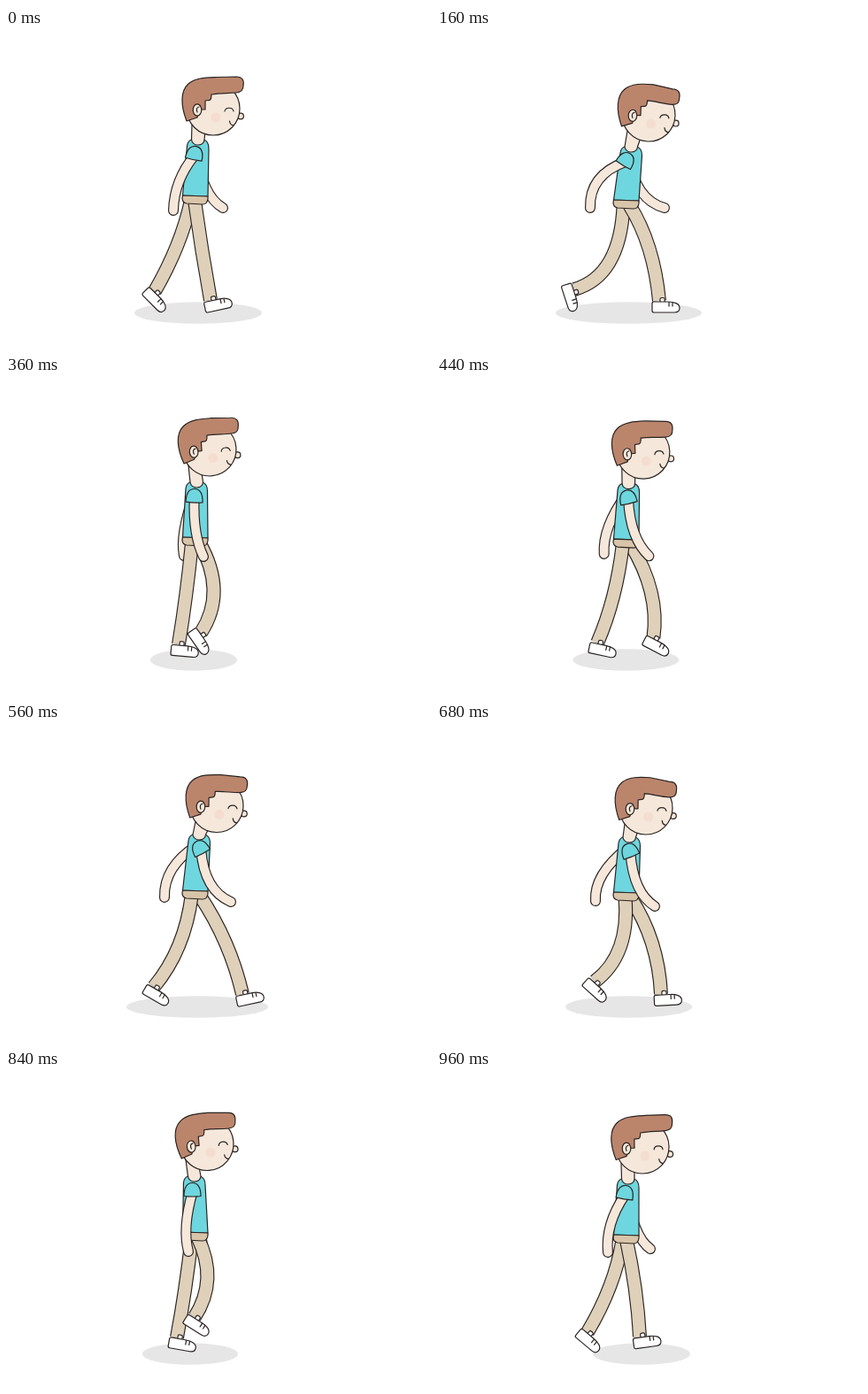
Write an HTML page that moves like this. It is 480 px wide and 360 px high and loops after 1000 ms.

```html
<!DOCTYPE html>
<html lang="en">
<head>
<meta charset="utf-8">
<title>Walk cycle</title>
<style>
  html, body { margin: 0; width: 100%; height: 100%; overflow: hidden; background: #fff; }
  svg { display: block; width: 100%; height: 100%; }
  .ink { stroke: #2a2422; stroke-width: 1.2; stroke-linejoin: round; stroke-linecap: round; }
  .line { fill: none; }
  .skin { fill: #f5e7da; }
  .shirt { fill: #6ed6de; }
  .hair { fill: #bb856c; }
  .belt { fill: #d8c4a8; }
  .shoe { fill: #fff; }
  .limb { fill: none; }
  .arm { stroke-linecap: round; }
</style>
</head>
<body>
<svg viewBox="0 0 480 360" xmlns="http://www.w3.org/2000/svg">
  <defs>
    <g id="shoe">
      <rect class="ink shoe" x="1" y="-3.5" width="5" height="7" rx="1.5"/>
      <path class="ink shoe" d="M-6 1H10C17 1 23 3 23 8Q23 13 17 13H-6Q-8 13 -8 11V3Q-8 1 -6 1Z"/>
      <path class="ink line" d="M11 1.5V6M15 2V6"/>
    </g>
  </defs>
  <ellipse id="shadow" cy="321.5" ry="12.3" fill="#e6e6e6"/>
  <g id="farArm"></g>
  <g id="farLeg"></g>
  <g id="nearLeg"></g>
  <path id="torso" class="ink shirt"/>
  <path id="belt" class="ink belt"/>
  <path id="neck" class="ink skin"/>
  <g id="head">
    <circle class="ink skin" cx="31" cy="8.5" r="3.4"/>
    <circle class="ink skin" r="30"/>
    <circle cx="3" cy="10" r="5.5" fill="#f4ddd0"/>
    <path id="hair" class="ink hair"/>
    <ellipse class="ink skin" cx="-18" cy="1.5" rx="4.8" ry="6.6"/>
    <path class="ink line" d="M-16 -2Q-20 -1 -18 4"/>
    <path class="ink line" d="M13 3C14 -2 22 -2 23 3M18.500 14Q19 18.500 23 19"/>
  </g>
  <g id="nearArm"></g>
  <path id="sleeve" class="ink shirt" d="M-9.500 13C-9.500 3 -6 -2 0 -2S9.500 3 9.500 13Q0 14 -9.500 13Z"/>
</svg>
<script>
const LOOP = 1000, STEP = 40;
const $ = id => document.getElementById(id);

// Each row: time, then pose values.
const body = [ // head x, y, tilt, fringe drop, chest x, y, hem y, shadow left, right
  [0, 234, 91, 0, 0, 216.5, 126, 189, 145, 289],
  [160, 239, 98, 2, 6, 219, 134, 194, 134, 299],
  [360, 230, 84, -4, 2, 215, 121, 183, 163, 261],
  [560, 238, 94.5, 1, 3, 218, 127, 190, 136, 296],
  [680, 236, 97, 1, 6, 217, 130, 192, 145, 288],
  [840, 227, 84.5, -5, 3, 212.5, 121, 184, 154, 262],
  [960, 232, 88, -1, 0, 215.5, 124, 187, 176, 286]
];
const nearArm = [ // bend x, y, hand x, y, sleeve angle
  [0, 190, 172, 189, 206, 12],
  [160, 172, 166, 173, 203, 31],
  [360, 211, 180, 223, 205, 2],
  [560, 224, 190, 254, 203, -28],
  [680, 222, 193, 246, 208, -22],
  [840, 199, 180, 206, 206, 0],
  [960, 190, 175, 193, 207, 9]
];
const farArm = [ // bend x, y, hand x, y
  [0, 222, 190, 245, 203],
  [160, 224, 194, 257, 203],
  [360, 196, 180, 201, 204],
  [560, 178, 163, 179, 198],
  [680, 177, 172, 179, 202],
  [840, 220, 180, 222, 200],
  [960, 222, 190, 241, 203]
];
const nearLeg = [ // knee x, y, ankle x, y, foot angle
  [0, 221, 252, 231, 307, -12],
  [80, 240, 248, 258, 307, -9],
  [160, 245, 244, 251, 308, 0],
  [360, 204, 250, 195, 304, 5],
  [560, 202, 257, 167, 299, 30],
  [620, 207, 262, 164, 296, 42],
  [680, 218, 263, 178, 293, 42],
  [840, 240, 238, 213, 280, 32],
  [960, 226, 248, 229, 302, -8]
];
const farLeg = [
  [0, 198, 245, 168, 297, 45],
  [160, 207, 280, 155, 295, 72],
  [360, 250, 245, 220, 291, 55],
  [560, 253, 247, 267, 307, -12],
  [680, 250, 246, 253, 307, -3],
  [840, 203, 250, 193, 303, 10],
  [960, 201, 245, 170, 297, 40]
];

// Cyclic cubic interpolation that never overshoots its keys.
function pose(keys, t) {
  const n = keys.length;
  const key = (i, k) => {
    const turn = Math.floor(i / n), row = keys[i - turn * n];
    return k ? row[k] : row[0] + turn * LOOP;
  };
  let i = n - 1;
  while (keys[i][0] > t) i--;
  const slope = (j, k) => (key(j + 1, k) - key(j, k)) / (key(j + 1, 0) - key(j, 0));
  const tangent = (j, k) => {
    const a = slope(j - 1, k), b = slope(j, k);
    return a * b > 0 ? 2 * a * b / (a + b) : 0;
  };
  const span = key(i + 1, 0) - key(i, 0), u = (t - key(i, 0)) / span;
  return keys[i].slice(1).map((from, c) => {
    const k = c + 1, to = key(i + 1, k);
    return from + (to - from) * u * u * (3 - 2 * u)
      + span * u * (1 - u) * (tangent(i, k) * (1 - u) - tangent(i + 1, k) * u);
  });
}

function makeLimb(id, kind, width, fill, extra = "") {
  const path = (color, w) => `<path class="limb ${kind}" stroke="${color}" stroke-width="${w}"/>`;
  $(id).innerHTML = path("#2a2422", width) + path(fill, width - 2.3) + extra;
}
const foot = '<use href="#shoe"/>';
makeLimb("farArm", "arm", 12, "#f5e7da");
makeLimb("nearArm", "arm", 12, "#f5e7da");
makeLimb("farLeg", "leg", 16, "#dfd0ba", foot);
makeLimb("nearLeg", "leg", 16, "#dfd0ba", foot);

const place = (el, x, y, angle) =>
  el.setAttribute("transform", `translate(${x} ${y}) rotate(${angle})`);
const shape = (id, d) => $(id).setAttribute("d", d);

function bend(id, x, y, [bx, by, ex, ey]) {
  for (const p of $(id).querySelectorAll(".limb"))
    p.setAttribute("d", `M${x} ${y}Q${bx} ${by} ${ex} ${ey}`);
}

function drawLeg(id, keys, t, hem) {
  const p = pose(keys, t);
  bend(id, 212 + 0.18 * (p[0] - 215), hem + 6, p);
  place($(id).querySelector("use"), p[2], p[3], p[4]);
}

function draw(t) {
  const [hx, hy, tilt, drop, cx, cy, hem, left, right] = pose(body, t);
  $("shadow").setAttribute("cx", (left + right) / 2);
  $("shadow").setAttribute("rx", (right - left) / 2);

  drawLeg("farLeg", farLeg, t, hem);
  drawLeg("nearLeg", nearLeg, t, hem);
  bend("farArm", cx - 2, cy + 12, pose(farArm, t));

  const arm = pose(nearArm, t), angle = arm[4], rad = angle * Math.PI / 180;
  const sx = cx - 2, sy = cy + 9.5;
  bend("nearArm", sx - 9 * Math.sin(rad), sy + 9 * Math.cos(rad), arm);
  place($("sleeve"), sx, sy, angle);

  shape("torso", `M${cx - 7} ${cy}Q${cx - 11} ${cy + 1} ${cx - 12} ${cy + 7}L199.500 ${hem}
    L228 ${hem + 1}L${cx + 12.5} ${cy + 10}Q${cx + 12.5} ${cy + 2} ${cx + 7} ${cy}Z`);
  shape("belt", `M199.500 ${hem}L228 ${hem + 1}V${hem + 4}Q227 ${hem + 10} 222 ${hem + 10}
    L204 ${hem + 9}Q199 ${hem + 8} 199 ${hem + 3}Z`);
  shape("neck", `M${hx - 24} ${hy + 18}L${cx - 7} ${cy}C${cx - 6} ${cy + 8} ${cx + 7} ${cy + 8}
    ${cx + 7.5} ${cy}L${hx - 9} ${hy + 26}Z`);

  place($("head"), hx, hy, tilt);
  shape("hair", `M-30 14C-37 -4 -37 -20 -28 -28C-20 -35 -8 -35 4 ${-35.5 + drop * 0.2}
    L26 ${-36 + drop}C33 ${-36 + drop} 35 ${-32 + drop} 34 ${-26 + drop}
    C34 ${-20 + drop} 31 ${-18.5 + drop} 26 ${-18 + drop * 0.9}
    C16 ${-17 + drop * 0.7} 8 ${-18 + drop * 0.4} -2 -16Q-2 -9 -5 -9.500L-9 -9V1H-15V-4L-18 10Z`);
}

function tick(now) {
  draw(Math.floor(now % LOOP / STEP) * STEP);
  requestAnimationFrame(tick);
}
draw(0);
let start;
requestAnimationFrame(function first(now) {
  start = now;
  const run = time => {
    draw(Math.floor(Math.max(0, time - start) % LOOP / STEP) * STEP);
    requestAnimationFrame(run);
  };
  run(now);
});
</script>
</body>
</html>
```
